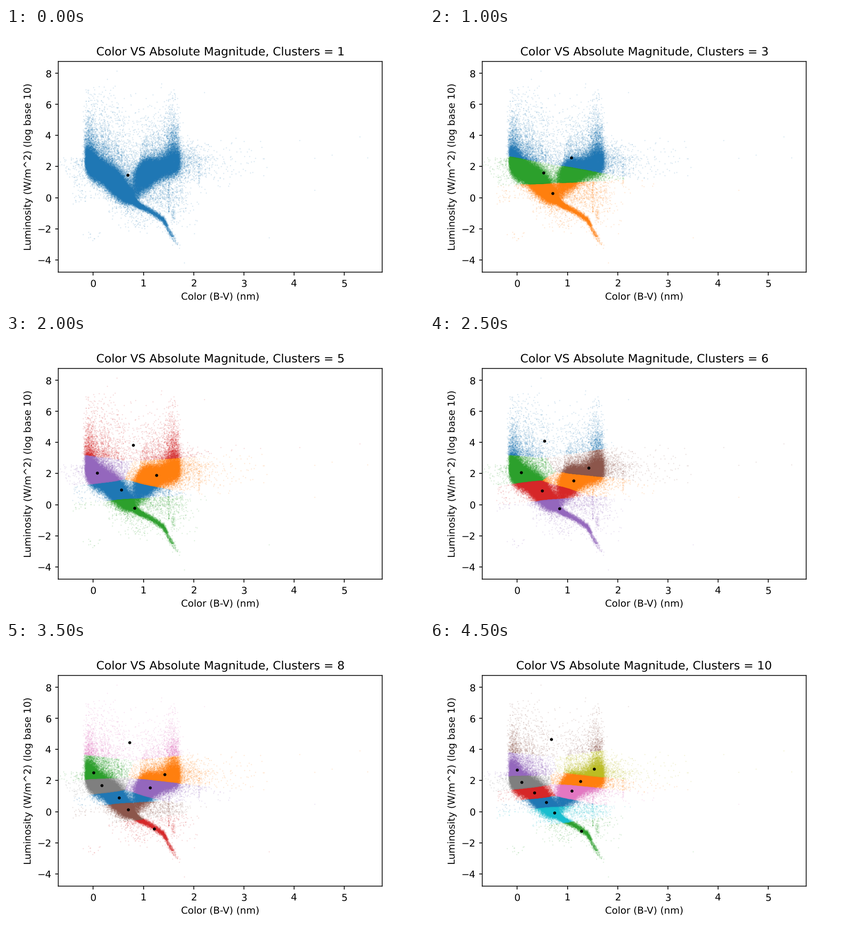
A matplotlib script that plays this animation: 917 px wide and 611 px high, repeating every 5000 ms.

```python
import numpy as np
import matplotlib.pyplot as plt
from matplotlib.animation import FuncAnimation

W, H, DPI = 917, 611, 152.75
rng = np.random.default_rng(12)

# Colour indices for one to ten clusters, from faint to bright:
# along the main sequence | along the giants | bright stars on top
PALETTES = ["0||", "10||", "12||0", "13|0|2", "204|1|3", "432|15|0",
            "2631|50|4", "35072|41|6", "471285|63|0", "290374|618|5"]

RIDGE_X = [-.2, 0, .25, .5, .7, .9, 1.2, 1.4, 1.5, 1.7]
RIDGE_Y = [2.6, 2.02, 1.45, .8, .08, -.46, -.98, -1.42, -2.1, -3.1]


def ridge(x):
    """Middle of the main sequence."""
    return np.interp(x, RIDGE_X, RIDGE_Y)


def giant_line(x):
    return 1.5 + 1.1 * (x - 1)


def fade(x, mid, width):
    return 1 / (1 + np.exp((x - mid) / width))


def main_sequence(x):
    z = rng.normal(size=x.size)
    down = .1 + .26 * fade(x, .68, .05)
    up = .1 + .3 * fade(x, .78, .04)
    y = ridge(x) + z * np.where(z < 0, down, up)
    return x + rng.normal(0, .015, x.size), y


def giants(x):
    return x, giant_line(x) + rng.normal(0, .38, x.size)


def plume(x, base, scale):
    """Bright stars thinning out upwards."""
    return x, base(x) + .35 + rng.exponential(scale, x.size)


def below(x):
    return x, ridge(x) - np.abs(rng.normal(0, .65, x.size))


def box(n, x0, x1, y0, y1):
    return rng.uniform(x0, x1, n), rng.uniform(y0, y1, n)


def blob(n, x, y, sx, sy):
    return rng.normal(x, sx, n), rng.normal(y, sy, n)


def make_stars():
    sub = rng.normal(.88, .12, 2600)
    parts = [
        main_sequence(-.17 + rng.gamma(3, .065, 21000)),
        main_sequence(rng.normal(.47, .18, 43000)),
        main_sequence(rng.uniform(.8, 1.46, 2500)),
        main_sequence(rng.normal(1.5, .07, 350)),
        giants(rng.normal(1.05, .1, 20000)),
        giants(rng.uniform(1, 1.7, 18000) + rng.normal(0, .025, 18000)),
        (sub, giant_line(sub) - .75 + rng.normal(0, .33, sub.size)),
        plume(-.22 + rng.gamma(3.5, .065, 3000), ridge, .85),
        plume(rng.uniform(.15, .92, 3200), ridge, 1.05),
        plume(rng.uniform(.93, 1.7, 2400), giant_line, .8),
        plume(rng.normal(1.57, .08, 1900), giant_line, .8),
        below(rng.normal(.35, .35, 1300)),
        blob(600, 1.3, .45, .27, .55),
        blob(60, 1.59, -1.05, .025, .3),
        box(150, .9, 1.9, -1, .6),
        box(80, 1.495, 1.505, -.9, 1.5),
        box(30, 2.095, 2.105, .9, 2.2),
        box(60, -.35, 1.9, -.02, .02),
        box(70, -.41, -.15, -.4, 2.6),
        box(12, -.2, .2, -2.8, -2.1),
        box(70, .2, 2.2, -2.4, 0),
        (1.7 + rng.exponential(.17, 650), rng.normal(2.2, .6, 650)),
        (1.85 + rng.exponential(.5, 250), rng.normal(2.4, .75, 250)),
    ]
    stars = np.hstack([np.array(p) for p in parts])
    stars = stars[:, (stars[1] < 7.2) & (stars[0] < 3.5)]
    strays = [(.47, 8.15), (.28, 7.62), (1.36, 7.32), (2.21, 6.77),
              (4.11, 3.7), (5.31, 3.92), (5.46, 2.56), (4.75, 2.76),
              (4.41, .5), (4.41, 2.53), (3.5, -2.58), (1.81, -4.2)]
    stars = np.hstack([stars, np.array(strays).T])
    return stars[:, rng.permutation(stars.shape[1])]


def nearest(points, centres):
    dist = [(points[0] - x) ** 2 + (points[1] - y) ** 2 for x, y in centres]
    return np.argmin(dist, axis=0)


def steps(n):
    """n evenly spaced values within -1..1."""
    return (2 * np.arange(n) + 1) / max(n, 1) - 1


def find_centres(palette, points, rounds=6):
    """Place centres along the branches, then refine them by k-means."""
    n_main, n_giant, n_top = map(len, palette.split("|"))
    k = n_main + n_giant + n_top
    u = steps(n_main)
    y = .87 + 1.6 * u + 1.2 * u ** 3
    x = np.maximum(np.interp(y, RIDGE_Y[::-1], RIDGE_X[::-1]), .1)
    gy = 1.75 + .1 * n_giant + steps(n_giant)
    gx = np.minimum(1.1 + .33 * (gy - 1.5), 1.41)
    top = [(.8, 3.3 + .23 * (k - 4))] * n_top
    centres = np.array([*zip(x, y), *zip(gx, gy), *top])
    for _ in range(rounds):
        labels = nearest(points, centres)
        count = np.maximum(np.bincount(labels, minlength=k), 1)
        centres = np.array([np.bincount(labels, p, k) / count
                            for p in points]).T
    return centres


stars = make_stars()
centres = [find_centres(p, stars[:, ::3]) for p in PALETTES]

plt.rcParams["font.family"] = "DejaVu Sans"
plt.rcParams["text.hinting"] = "none"
fig = plt.figure(figsize=((W + .001) / DPI, (H + .001) / DPI), dpi=DPI,
                 facecolor="white")
ax = fig.add_axes([.125, .125, .775, .755])
ax.set(xlim=(-.696, 5.753), ylim=(-4.793, 8.763),
       xticks=range(6), yticks=range(-4, 9, 2))
ax.tick_params(axis="x", pad=4)
ax.set_xlabel("Color (B-V) (nm)", fontsize=10)
ax.set_ylabel("Luminosity (W/m^2) (log base 10)", fontsize=10)
title = ax.set_title("", fontsize=12, pad=6.4)
for spine in ax.spines.values():
    spine.set_snap(False)

groups = [ax.plot([], [], "o", color=f"C{i}", ms=1.3, mew=0, alpha=.15)[0]
          for i in range(10)]
dots, = ax.plot([], [], "o", color="black", ms=3.1, mew=0, zorder=5)


def draw(i):
    labels = nearest(stars, centres[i])
    for group in groups:
        group.set_data([], [])
    for k, colour in enumerate(PALETTES[i].replace("|", "")):
        groups[int(colour)].set_data(*stars[:, labels == k])
    dots.set_data(*centres[i].T)
    title.set_text(f"Color VS Absolute Magnitude, Clusters = {i + 1}")
    return [*groups, dots, title]


anim = FuncAnimation(fig, draw, frames=len(PALETTES),
                     init_func=lambda: draw(0), interval=500,
                     repeat=True, repeat_delay=0, blit=False)
plt.show()
```
